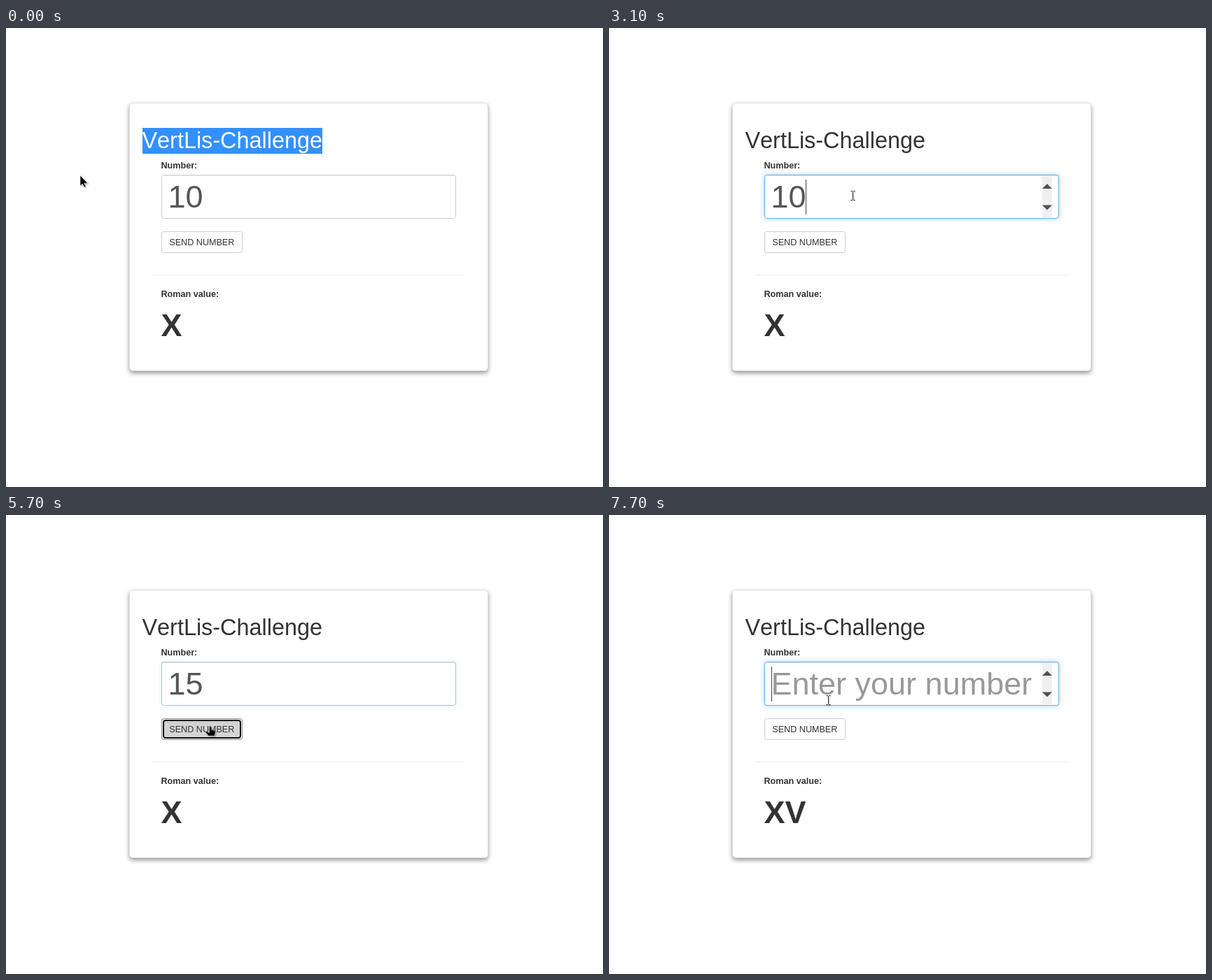
These frames come from a looping animation (853 by 657 pixels, 8000 ms). An HTML page:

```html
<!DOCTYPE html>
<html lang="en">
<head>
<meta charset="utf-8">
<title>Roman numeral form</title>
<style>
html, body { margin: 0; width: 100%; height: 100%; overflow: hidden; background: #fff; }
div { position: absolute; box-sizing: border-box; background: #fff; }
.card { left: 176px; top: 107px; width: 513px; height: 384px; border: 1px solid #e3e3e3;
  border-radius: 5px; box-shadow: 0 3px 6px rgba(0,0,0,.42); }
.rule { left: 208px; top: 353px; width: 448px; height: 1px; background: #eee; }
#field { --focus: 0; left: 222px; top: 210px; width: 421px; height: 63px; border-radius: 3.6px;
  border: 1px solid color-mix(in srgb, #66afe9 calc(var(--focus) * 100%), #ccc);
  box-shadow: inset 0 1px 1px rgba(0,0,0,.075), 0 0 7.2px rgba(102,175,233,calc(var(--focus) * .6)); }
#button { left: 222px; top: 291px; width: 116px; height: 31px; border: 1px solid #ccc; border-radius: 3.6px; }
#button.hover { background: #e6e6e6; border-color: #adadad; }
#button.focus, #button.active { background: #e6e6e6; border-color: #8c8c8c;
  outline: 5px auto #101010; outline-offset: -2px; }
#button.active { background: #d4d4d4; box-shadow: inset 0 3px 5px rgba(0,0,0,.125); }
svg { position: absolute; left: 0; top: 0; }
text { font-family: "Liberation Sans", Arial, sans-serif; font-size: 12.6px; fill: #333; white-space: pre; }
.bold { font-weight: bold; }
.big { font-size: 45px; }
#title { font-size: 32.4px; font-kerning: none; }
.select { fill: #3390ff; }
.pointer { filter: drop-shadow(1px 1px 1px rgba(0,0,0,.35)); }
</style>
</head>
<body>
<div class="card"></div>
<div class="rule"></div>
<div id="field"></div>
<div id="button"></div>
<svg width="853" height="657" viewBox="0 0 853 657">
  <rect id="titleSelect" class="select" x="195" y="143" width="257" height="37"/>
  <text id="title" x="194.5" y="172">VertLis-Challenge</text>
  <text class="bold" x="221.5" y="201">Number:</text>
  <rect id="valueSelect" class="select" x="232" y="211" width="50" height="61"/>
  <text id="value" class="big" x="231.5" y="257"></text>
  <rect id="caret" y="217" width="1" height="50" fill="#444"/>
  <g id="spinner">
    <rect x="619" y="212" width="14" height="59" fill="#f0f0f0"/>
    <path d="M619 230l7-7 7 7zM619 253.5h14l-7 7z" fill="#505050"/>
  </g>
  <text x="233.3" y="311">SEND NUMBER</text>
  <text class="bold" x="221.5" y="385">Roman value:</text>
  <text id="result" class="big bold" x="221.5" y="441"></text>
  <g id="cursor">
    <path id="arrow" class="pointer" d="M0 0V15L3.3 12 5.7 17 8 16 5.7 11.2H10.6Z" fill="#000" stroke="#fff" stroke-width=".6"/>
    <g id="beam" class="pointer" fill="none" stroke="#222">
      <path d="M-3.5-6.5H-1.5L-.5-5.5V5.5L-1.5 6.5H-3.5M2.5-6.5H.5L-.5-5.5M-.5 5.5L.5 6.5H2.5"/>
    </g>
    <path id="hand" class="pointer" d="M-1.5 1Q0-1 1.5 1V4.5L6 5.5Q7.5 6 7 8L6 13H-2.5L-7 8Q-6.5 6-4.5 7L-1.5 9Z" fill="#000" stroke="#ddd" stroke-width=".4"/>
  </g>
</svg>
<script>
const LOOP = 8000;
const PLACEHOLDER = "Enter your number";
const $ = id => document.getElementById(id);

const initial = {
  pointer: "arrow", at: [106, 211], titleSelected: true, valueSelected: false,
  value: "10", result: "X", focus: 0, spinner: false, caret: null, button: ""
};

// Each step changes part of the state and holds until the next one.
const steps = [
  [100, { at: [117, 181] }],
  [200, { at: [129, 150] }],
  [500, { titleSelected: false }],
  [2200, { result: "Calculating..." }],
  [2300, { at: [187, 174] }],
  [2400, { at: [251, 199] }],
  [2600, { at: [325, 232], pointer: "beam", spinner: true }],
  [2700, { at: [349, 240] }],
  [3000, { focus: .5, caret: 281 }],
  [3100, { focus: 1, result: "X" }],
  [3700, { caret: null }],
  [4300, { caret: 281 }],
  [4600, { value: "1", caret: 256 }],
  [4800, { value: "15", caret: 281 }],
  [5200, { at: [343, 251] }],
  [5300, { at: [322, 279], pointer: "arrow" }],
  [5400, { at: [300, 299], pointer: "hand", button: "hover", caret: null }],
  [5500, { at: [292, 303] }],
  [5700, { button: "active", focus: .3, spinner: false }],
  [5900, { button: "focus", focus: 0, result: "Calculating..." }],
  [6200, { result: "XV" }],
  [6800, { at: [305, 281], pointer: "arrow" }],
  [6900, { at: [314, 265], pointer: "beam", spinner: true }],
  [7100, { button: "", focus: .85, caret: 281 }],
  [7200, { focus: 1 }],
  [7500, { valueSelected: true, caret: null }],
  [7700, { valueSelected: false, value: "", caret: 232 }]
];

function show(id, visible) {
  $(id).style.display = visible ? "" : "none";
}

function draw(time) {
  const state = Object.assign({}, initial,
    ...steps.filter(([start]) => start <= time).map(([, change]) => change));

  show("titleSelect", state.titleSelected);
  $("title").style.fill = state.titleSelected ? "#fff" : "#333";
  show("valueSelect", state.valueSelected);
  $("value").textContent = state.value || PLACEHOLDER;
  $("value").style.fill = state.valueSelected ? "#fff" : state.value ? "#555" : "#999";
  $("result").textContent = state.result;

  show("caret", state.caret !== null);
  $("caret").setAttribute("x", state.caret ?? 0);
  show("spinner", state.spinner);
  $("field").style.setProperty("--focus", state.focus);
  $("button").className = state.button;

  for (const kind of ["arrow", "beam", "hand"]) show(kind, kind === state.pointer);
  $("cursor").setAttribute("transform", `translate(${state.at})`);
}

const start = performance.now();
function tick() {
  draw((performance.now() - start) % LOOP);
  requestAnimationFrame(tick);
}
tick();
</script>
</body>
</html>
```
